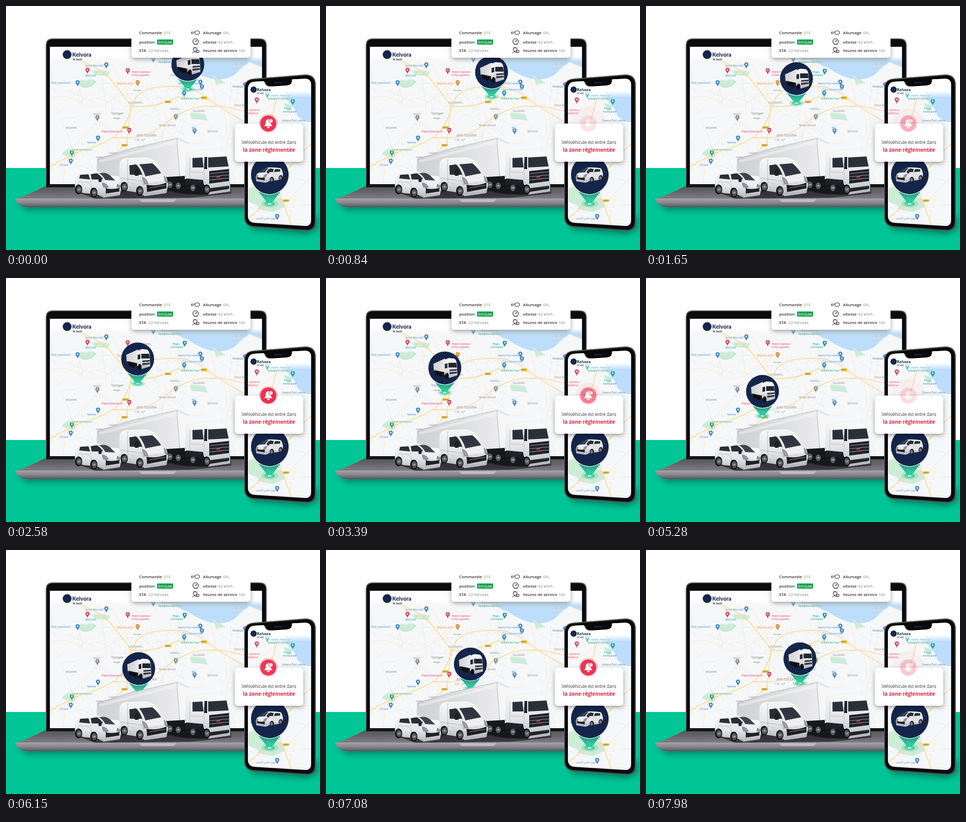
These frames come from a looping animation (601 by 467 pixels, 8 s). An HTML page:

```html
<!DOCTYPE html>
<html lang="fr">
<head>
<meta charset="utf-8">
<title>Suivi de flotte</title>
<style>
html, body { margin: 0; width: 100%; height: 100%; overflow: hidden; background: #fff; }
svg { display: block; width: 601px; height: 467px; }
text { font-family: "Open Sans", "Noto Sans", sans-serif; }
.map text { font-family: Roboto, "DejaVu Sans", sans-serif; }
.brand text { font-family: Inter, sans-serif; font-weight: 700; fill: #14284a; }
.key { font-size: 7.8px; font-weight: 600; fill: #30323a; }
.value { font-size: 7.3px; fill: #7b7d83; }
.road { fill: none; stroke: #fadb8c; stroke-width: 1.5; stroke-linejoin: round; }
.lane { fill: none; stroke: #fcecc0; stroke-width: .9; }
.icon { fill: none; stroke: #3b3d44; stroke-width: 1.2; }
.streets { fill: none; stroke: #e6e8ed; stroke-width: .7; }
</style>
</head>
<body>
<svg viewBox="0 0 601 467">
<defs>
  <linearGradient id="deck" x2="0" y2="1"><stop stop-color="#55535a"/><stop offset="1" stop-color="#817f86"/></linearGradient>
  <linearGradient id="lip" x2="0" y2="1"><stop stop-color="#a09ea6"/><stop offset=".45" stop-color="#8a8890"/><stop offset="1" stop-color="#57555c"/></linearGradient>
  <linearGradient id="side"><stop stop-color="#cfd0d3"/><stop offset="1" stop-color="#ececee"/></linearGradient>
  <linearGradient id="body" x2="0" y2="1"><stop stop-color="#f7f7f8"/><stop offset=".6" stop-color="#e2e3e6"/><stop offset="1" stop-color="#b3b5ba"/></linearGradient>
  <linearGradient id="beam" x2="0" y2="1"><stop stop-color="#0b9f7b"/><stop offset="1" stop-color="#35cfa5" stop-opacity=".85"/></linearGradient>
  <linearGradient id="header" x2="0" y2="1"><stop offset=".65" stop-color="#fff"/><stop offset="1" stop-color="#fff" stop-opacity="0"/></linearGradient>
  <filter id="shadow" x="-20%" y="-30%" width="140%" height="170%"><feDropShadow dx="0" dy="3" stdDeviation="4" flood-opacity=".36"/></filter>
  <filter id="soft" x="-20%" y="-80%" width="140%" height="260%"><feGaussianBlur stdDeviation="6"/></filter>
  <clipPath id="screen"><rect x="84" y="78" width="406" height="263"/></clipPath>
  <clipPath id="phoneScreen"><path d="M463 160Q463 146 475 145L572 139Q584 139 584 152V409Q584 422 572 421L476 415Q464 414 463 403Z"/></clipPath>
  <clipPath id="belowLid"><rect x="220" y="62" width="270" height="70"/></clipPath>
  <clipPath id="aboveCard"><rect x="460" y="180" width="90" height="45"/></clipPath>

  <g id="wheel"><ellipse rx="7" ry="9.500" fill="#17181b"/><ellipse cx=".8" rx="4.500" ry="6.300" fill="#74777c"/><path d="M-2-4L4 4M4-4L-2 4M1-6V6" stroke="#34363a" stroke-width="1.200"/><ellipse cx="1" rx="1.600" ry="2.200" fill="#a3a5a9"/></g>

  <g id="car">
    <path fill="url(#body)" d="M132 348Q131 329 139 320Q151 316 176 317Q189 317 201 329L212 335Q220 339 220 351L218 362L187 367L176 361L149 358L134 354Z"/>
    <path fill="#2a2e35" d="M162 322L174 320Q181 324 186 332L164 332ZM142 323L158 322L161 332L140 330Z"/>
    <path fill="#3b434c" d="M178 320Q192 317 200 325L209 334L190 333Q185 324 178 320Z"/>
    <path fill="#eceef0" d="M190 335L211 336L218 346L188 346Z"/>
    <path fill="#202227" d="M191 349Q205 352 217 348V355L191 359Z"/>
    <path stroke="#a6a8ad" stroke-width=".7" fill="none" d="M162 333L164 357M140 336L160 338M186 334L187 348M195 362L216 359"/>
    <path fill="#8f989f" stroke="#55585e" stroke-width=".6" d="M184 339Q191 338 196 346L192 349L186 346ZM213 341L219 344L218 348L212 346Z"/>
    <rect x="177" y="330" width="6" height="7" rx="2" fill="#222429"/>
    <use href="#wheel" x="139" y="351"/><use href="#wheel" x="168" y="357"/>
  </g>

  <g id="miniTruck">
    <path fill="url(#side)" d="M-22-8L0-18L3-15V11L-21 5Z"/>
    <path fill="#191b20" d="M-20 4L4 9V18L-18 12Z"/>
    <path fill="url(#body)" d="M-1-12Q2-19 9-19L18-18Q22-16 23-8L24 14L9 19L-1 13Z"/>
    <path fill="#22272f" d="M7-10L22-10L23-1L7-1ZM0-8L5-9V0L0 1Z"/>
    <path fill="#34373e" d="M9 3L23 2V5L9 6ZM9 8L23 7V10L9 12Z"/>
    <g fill="#0d0e11"><ellipse cx="-14" cy="10" rx="3" ry="4"/><ellipse cx="-8" cy="12" rx="3" ry="4.500"/><ellipse cx="4" cy="15" rx="3.500" ry="5.500"/></g>
  </g>

  <g id="beacon">
    <ellipse cy="47" rx="14" ry="6" fill="#43d3a5" opacity=".35"/>
    <ellipse cy="47" rx="9" ry="3.700" fill="#2fc898" opacity=".7"/>
    <path fill="url(#beam)" d="M-19 27Q0 38 19 27L2 48Q0 50-2 48Z"/>
    <ellipse cy="47" rx="3" ry="1.300" fill="#d8fff2"/>
    <circle r="31.500" fill="#14254a"/>
  </g>
  <path id="pin" d="M0 4.500C-1-.2-4-1.200-4-4a4 4 0 0 1 8 0C4-1.200 1-.2 0 4.500Z"/>
</defs>

<rect y="310" width="601" height="157" fill="#00c595"/>

<!-- laptop -->
<path d="M22 376H475V390H40Z" fill="#00513f" opacity=".6" filter="url(#soft)"/>
<path d="M76 347V75Q76 62 89 62H486Q499 62 499 75V347Z" fill="#6d6d71"/>
<path d="M77.500 347V76Q77.500 63.500 90 63.500H485Q497.500 63.500 497.500 76V347Z" fill="#0c0c0e"/>
<g class="map" clip-path="url(#screen)">
  <rect x="84" y="78" width="406" height="263" fill="#f6f7f9"/>
  <path fill="#bcdefa" d="M291 79L300 100Q322 103 337 114Q350 119 368 130Q390 142 413 140Q435 138 447 122L466 107L491 118V79Z"/>
  <path fill="#cdebd5" d="M133 149Q141 138 154 143Q164 136 173 145Q164 158 149 157ZM165 124Q181 120 199 126L194 134L170 132ZM395 132L420 147L402 151ZM352 204L381 207L386 219L355 216ZM106 283L119 272L136 281L128 292Z"/>
  <g id="streets" class="streets"></g>
  <path class="lane" d="M85 175Q124 168 144 186T200 181L250 140L292 112M109 343Q111 274 159 241L191 195L180 108M275 283L315 220L336 142M420 290L435 202L447 150L491 139M201 110L222 146L243 190L315 245"/>
  <path class="road" d="M85 308Q119 286 151 275T207 252Q231 229 241 192T301 155Q350 147 388 178T491 238M205 251Q260 259 299 229T365 194Q422 184 491 215M139 104Q181 117 205 146L239 190L232 262L193 296M241 191Q285 197 327 174L390 179"/>
  <g id="places"></g>
  <rect x="84" y="78" width="406" height="28" fill="url(#header)"/>
</g>
<g class="brand"><circle cx="117" cy="93" r="8.500" fill="#14284a"/><text x="127" y="96.500" font-size="9.800">Kelvora</text><text x="128" y="104" font-size="5">hi-tech</text></g>

<g id="badge"><use href="#beacon"/><use href="#miniTruck"/></g>

<path d="M76 345H478V371H18Z" fill="url(#deck)"/>
<path d="M77 341H498V347H77Z" fill="#151517"/>
<path d="M18 369H478V385H42Q20 383 18 369Z" fill="url(#lip)"/>
<path d="M18 369H478" stroke="#b5b3ba" stroke-width=".8"/>
<path d="M254 370H326Q323 375 317 375H263Q257 375 254 370Z" fill="#c0bec5"/>

<!-- vehicles -->
<path d="M136 356L230 353L430 347L431 359L353 367L171 369Z" fill="#111217" opacity=".6"/>
<g id="truck">
  <path fill="url(#side)" d="M174 293L238 273L327 253L337 258V338L174 322Z"/>
  <path fill="#f6f6f7" d="M327 253L350 263V330H333Z"/>
  <path fill="none" stroke="#aeb1b6" stroke-width=".9" d="M174 293L238 273L327 253L350 263M327 253L333 330"/>
  <path fill="#fff" opacity=".35" d="M178 295L327 257V262L178 300Z"/>
  <path fill="#17181c" d="M296 328L345 325L420 346L389 361L345 360L298 352Z"/>
  <use href="#wheel" x="313" y="342"/><use href="#wheel" x="329" y="344"/><use href="#wheel" x="357" y="348"/>
  <path fill="url(#body)" d="M345 283Q350 271 365 272L407 275Q421 276 424 287L429 312V355L388 361L376 335L342 331Z"/>
  <path fill="#2a3038" d="M387 290L422 288L426 307L387 309ZM357 291L376 290L378 309L357 309Z"/>
  <path fill="#f7f8f8" d="M352 281L384 277L420 279L423 286L384 288L352 289Z"/>
  <path fill="#202328" d="M389 316L427 312V335L389 340ZM389 349L427 344V350L389 356ZM380 289H385V312H379ZM345 330L377 333L379 343L345 342Z"/>
  <path stroke="#9ca0a6" d="M390 321L427 317M390 327L427 323M390 333L427 329"/>
  <path stroke="#b5b7bc" stroke-width=".8" d="M352 290V330M379 312V333M353 318H378"/>
  <path fill="#ccd5dd" d="M389 342L399 341V346L390 348ZM418 338L427 337V342L418 343Z"/>
  <path fill="#c63b46" d="M403 326L410 325V328L403 329Z"/>
  <use href="#wheel" x="384" y="351"/>
</g>
<g id="van">
  <path fill="url(#body)" d="M217 347V306Q218 292 231 291L269 290Q282 291 291 304L303 321Q310 328 310 344L307 358L266 364L252 357L221 352Z"/>
  <path fill="#2f363f" d="M255 303L280 301Q288 307 297 320L267 326Q263 314 255 303Z"/>
  <path fill="#282d34" d="M236 305L249 303Q257 310 261 323L237 323Z"/>
  <path fill="#eff0f2" d="M264 328L299 322L307 333L266 339Z"/>
  <path fill="#1c1e22" d="M269 342Q288 346 307 338V349L270 356Z"/>
  <path fill="none" stroke="#a9abb0" stroke-width=".8" d="M233 293V350M261 324L262 343M218 329L260 335M275 348L305 343M267 360L307 355"/>
  <path fill="#99a2aa" stroke="#55595f" stroke-width=".6" d="M261 328Q269 329 272 340L265 341ZM303 325L309 332V339L304 335Z"/>
  <rect x="246" y="313" width="8" height="12" rx="2" fill="#1d2024"/>
  <use href="#wheel" x="226" y="346"/><use href="#wheel" x="256" y="354"/>
</g>
<use href="#car"/>

<!-- status card -->
<g clip-path="url(#belowLid)"><rect x="240" y="20" width="228" height="79" rx="6" fill="#fff" filter="url(#shadow)"/></g>
<rect x="240" y="20" width="228" height="79" rx="6" fill="#fff"/>
<text class="key" x="255" y="54">Commande</text><text class="value" x="302" y="54">213</text>
<text class="key" x="255" y="71.500">position</text>
<rect x="289" y="64" width="31" height="10" rx="2" fill="#16a34b"/><text x="304.500" y="71.700" text-anchor="middle" font-size="7.300" fill="#fff">Enroute</text>
<text class="key" x="255" y="88">ETA</text><text class="value" x="273" y="88">22 minutes</text>
<text class="key" x="377" y="54">Allumage</text><text class="value" x="415" y="54">ON</text>
<text class="key" x="377" y="71.500">vitesse</text><text class="value" x="406" y="71.500">42 km/h</text>
<text class="key" x="377" y="88">heures de service</text><text class="value" x="445" y="88">12h</text>
<g class="icon">
  <ellipse cx="366" cy="51" rx="4.500" ry="3.500"/><path d="M362 50H355V53H358L359 51.500"/>
  <circle cx="363" cy="68" r="5.500"/><path d="M362 69L366 65M359 68H360M363 64V65M359 73H367"/>
  <circle cx="362" cy="83" r="3.500"/><path d="M357 90Q358 87 362 88L365 89M359 80H365"/><circle cx="367" cy="87" r="2.500"/>
</g>

<!-- phone -->
<path d="M462 400L596 404V428L576 437L470 428Z" fill="#00513f" opacity=".6" filter="url(#soft)"/>
<path d="M456 158Q456 141 473 139L573 131Q593 131 593 151V412Q593 432 573 430L473 423Q456 421 456 404Z" fill="#4d4e53"/>
<path d="M457.500 158Q458 142 473 141L573 133Q591 133 591 151V411Q591 430 573 428L473 421Q458 419 457.500 404Z" fill="#09090b"/>
<g class="map" clip-path="url(#phoneScreen)">
  <rect x="460" y="136" width="126" height="290" fill="#f6f7f9"/>
  <path fill="#bcdefa" d="M527 143L537 180Q548 187 556 205T584 222V143Z"/>
  <path fill="#cdebd5" d="M464 350Q481 338 494 349L498 374Q483 386 464 374ZM466 230L482 238L464 250ZM480 375L527 366L535 384L511 394L483 389ZM531 186L549 190L541 205Z"/>
  <g id="phoneStreets" class="streets"></g>
  <path class="lane" d="M464 217L498 198L519 180M541 422L553 358L584 325"/>
  <path class="road" d="M464 405Q491 389 514 352T548 302T584 264M528 143L507 218L500 290L521 354L548 422"/>
  <g id="phonePlaces"></g>
  <rect x="460" y="140" width="126" height="35" fill="url(#header)"/>
</g>
<path d="M487 141L552 136Q547 138 547 145Q546 151 538 152L507 154Q498 154 496 148Q494 142 487 141Z" fill="#09090b"/>
<path d="M514 147L529 146" stroke="#313238" stroke-width="1.500" stroke-linecap="round"/>
<g class="brand"><circle cx="474" cy="160" r="6" fill="#14284a"/><text x="480.500" y="163" font-size="7">Kelvora</text><text x="481" y="168" font-size="3.500">hi-tech</text></g>
<use href="#beacon" transform="translate(504.500 323) scale(1.120 1.180)"/>
<circle cx="505" cy="323" r="36" fill="#14254a"/>
<use href="#car" transform="translate(608 122) scale(-.59 .59)"/>
<g clip-path="url(#aboveCard)"><circle id="halo" cx="502" cy="225" fill="#ed3154"/></g>
<rect x="438" y="225" width="131" height="73" rx="6" fill="#fff" filter="url(#shadow)"/>
<text x="503.500" y="264" text-anchor="middle" font-size="8.200" font-weight="500" fill="#33343b">Vehivéhicule est entré dans</text>
<text x="503.500" y="279" text-anchor="middle" font-size="9.900" font-weight="700" fill="#e52342">la zone réglementée</text>
<g id="bell" transform="translate(502 225)">
  <circle r="17.500" fill="#ff4060" opacity=".28"/><circle r="15.300" fill="#eb3150"/>
  <path fill="#fff" d="M-8 5Q-5 3-5-2Q-5-7-1-8Q0-10 1-8Q5-7 5-2Q5 3 8 5ZM-3 6H3Q2 9 0 9T-3 6Z"/>
  <circle cx="5" cy="-5" r="4" fill="#fff" stroke="#eb3150"/><path d="M5-7V-4.500M5-3.500V-2.800" stroke="#eb3150"/>
</g>
</svg>
<script>
const find = id => document.getElementById(id);
const colors = { blue: '#4688c8', red: '#df4863', green: '#4c9d6d', gray: '#858a92', orange: '#e28834', teal: '#249aa2' };

// text, center x, baseline, color, font size
const places = [
  ['Fenno Brio mall', 169, 116, 'blue'], ['Bab Soliv', 162, 135, 'teal'],
  ['Parc Land Nord 1', 106, 149, 'blue'], ['Oldport Marisian', 314, 103, 'teal'],
  ['Delegation Museum', 314, 109, 'teal'], ['Hôpital Salvane', 258, 128, 'red'],
  ['R Verlo ghalma', 257, 134, 'red'], ['Plage', 325, 128, 'teal'],
  ['municipale', 327, 134, 'teal'], ['MALABATA', 449, 113, 'gray', 4.5],
  ['Malabata', 444, 156, 'blue'], ['Varenz Port center', 349, 150, 'blue'],
  ['Gare Varenz Ville', 357, 162, 'blue'], ['Arènes du Tivar', 352, 179, 'teal'],
  ['Shop Dal Virou', 228, 150, 'orange'], ['SIDJAM', 251, 163, 'gray', 4.2],
  ['CASABARATA', 248, 187, 'gray', 4.5], ['ENGST', 174, 209, 'gray', 4.5],
  ['IDRISSIA', 323, 199, 'gray', 4.5], ['SELVIRANE', 369, 203, 'gray', 4.5],
  ['TANJA BALIA', 450, 192, 'gray', 4.5], ['Tanger', 213, 208, 'gray', 8],
  ['طنجة', 212, 216, 'gray', 6], ['MESNANA', 125, 235, 'gray', 4.5],
  ['Bniger Idrissia', 309, 230, 'gray'], ['MISHGHA', 396, 242, 'gray', 4.5],
  ['RVL', 360, 235, 'blue'], ['AIN TOLERA', 269, 250, 'gray', 7],
  ['عين تلرة', 257, 257, 'gray', 5.5], ['Hôpital Salvane RI', 203, 242, 'red'],
  ['Solvane', 164, 263, 'blue'], ['Stade Oul Kerimo', 145, 277, 'green'],
  ['Tolvexa', 111, 306, 'blue'], ['Livraison', 207, 283, 'gray'], ['médicaments', 187, 291, 'gray']
];
const pins = [
  [192, 116, 'blue'], [156, 126, 'red'], [137, 150, 'blue'], [282, 104, 'teal'], [233, 127, 'red'],
  [342, 128, 'teal'], [372, 149, 'blue'], [375, 158, 'blue'], [341, 170, 'teal'], [458, 154, 'blue'],
  [252, 150, 'orange'], [236, 241, 'red'], [176, 256, 'blue'], [126, 284, 'green'], [124, 300, 'blue'],
  [175, 217, 'gray'], [325, 215, 'gray'], [361, 242, 'blue']
];
const phonePlaces = [
  ['Oldport Marisian', 525, 173, 'teal', 5.5], ['Delegation Museum', 525, 179, 'teal', 5.5],
  ['Plage', 539, 198, 'teal', 5.5], ['municipale', 543, 204, 'teal', 5.5],
  ['Varenz Port center', 551, 221, 'blue', 5.5], ['Salvane', 475, 201, 'red', 5.5],
  ['ghalma', 473, 207, 'red', 5.5], ['CASABARATA', 487, 309, 'gray', 4.5],
  ['سوق الحي الجديد', 498, 408, 'blue', 5.5]
];
const phonePins = [[500, 172, 'teal'], [549, 186, 'teal'], [519, 406, 'blue'], [480, 183, 'red']];
const signs = [[310, 184], [229, 233], [227, 267], [379, 176]];

const label = ([text, x, y, color, size = 5]) =>
  `<text x="${x}" y="${y}" text-anchor="middle" font-size="${size}" fill="${colors[color]}"` +
  ` stroke="#fff" stroke-width=".7" paint-order="stroke">${text}</text>`;
const pin = ([x, y, color]) => `<g transform="translate(${x} ${y})"><use href="#pin" fill="${colors[color]}"/><circle cy="-4" r="1.4" fill="#fff"/></g>`;
const sign = ([x, y]) => `<rect x="${x - 6}" y="${y - 3}" width="12" height="5" rx="1" fill="#f2c94b"/>` +
  `<text x="${x}" y="${y + 1}" text-anchor="middle" font-size="3.6" fill="#6d5b24">P4601</text>`;

function streets(x, y, width, height, count) {
  let seed = 17, path = '';
  const random = () => (seed = seed * 16807 % 2147483647) / 2147483647;
  for (let i = 0; i < count; i++) {
    const angle = random() * 6.28, length = 12 + random() * 35;
    path += `M${x + random() * width} ${y + random() * height}q${Math.cos(angle) * length / 2 + 4} ` +
      `${Math.sin(angle) * length / 2} ${Math.cos(angle) * length} ${Math.sin(angle) * length}`;
  }
  return `<path d="${path}"/>`;
}
find('streets').innerHTML = streets(85, 145, 405, 190, 130);
find('phoneStreets').innerHTML = streets(464, 225, 120, 195, 45);
find('places').innerHTML = signs.map(sign).join('') + pins.map(pin).join('') + places.map(label).join('');
find('phonePlaces').innerHTML = sign([536, 373]) + phonePins.map(pin).join('') + phonePlaces.map(label).join('');

// time, x, y
const route = [
  [0, 348, 112], [810, 318, 126], [1650, 288, 139], [2580, 252, 155], [3270, 231, 169],
  [4170, 206, 195], [4680, 204, 209], [5280, 223, 217], [6150, 254, 227], [7200, 279, 217], [8000, 295, 208]
];
function positionAt(time) {
  const i = Math.max(1, route.findIndex(step => step[0] >= time));
  const a = route[i - 1], b = route[i], span = b[0] - a[0], u = (time - a[0]) / span;
  const slope = (k, axis) => {
    const p = route[Math.max(0, k - 1)], n = route[Math.min(route.length - 1, k + 1)];
    return (n[axis] - p[axis]) / (n[0] - p[0]) * span;
  };
  return [1, 2].map(axis =>
    a[axis] * (1 + 2 * u) * (1 - u) ** 2 + b[axis] * u * u * (3 - 2 * u) +
    slope(i - 1, axis) * u * (1 - u) ** 2 + slope(i, axis) * u * u * (u - 1));
}

const LOOP = 8000, PULSE = 1180;
const start = performance.now();
function draw(now) {
  const time = Math.floor(Math.max(0, now - start) % LOOP / 30) * 30;
  find('badge').setAttribute('transform', `translate(${positionAt(time).map(n => n.toFixed(2)).join(' ')})`);
  const glow = .5 + .5 * Math.cos((time / PULSE - .1) * 2 * Math.PI);
  find('bell').setAttribute('opacity', Math.min(1, glow * 1.08));
  find('halo').setAttribute('r', 17 + 18 * (1 - glow));
  find('halo').setAttribute('opacity', .02 + .08 * glow);
  requestAnimationFrame(draw);
}
draw(start);
</script>
</body>
</html>
```
